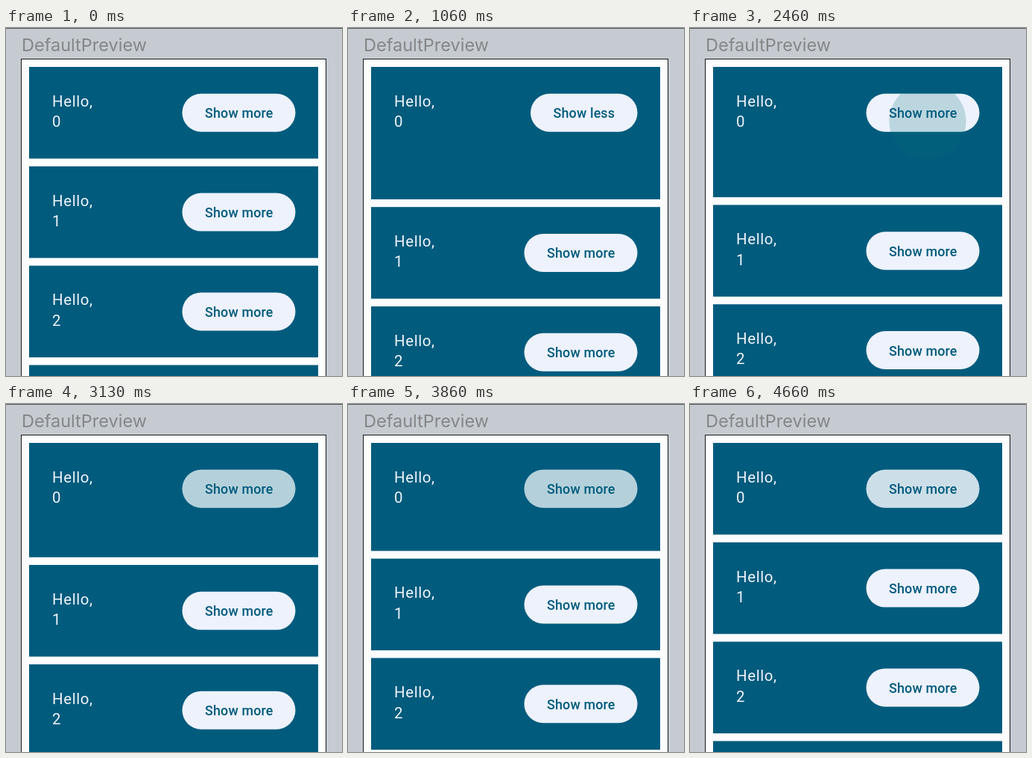
Recreate the animation shown at these times as an HTML page with a canvas. Size 451 by 465 pixels, loop 4730 ms.

```html
<!DOCTYPE html>
<html lang="en">
<head>
<meta charset="utf-8">
<title>Expandable list</title>
<style>
html, body { margin: 0; width: 100%; height: 100%; overflow: hidden; background: #c5cbd1; }
canvas { display: block; width: 451px; height: 465px; }
</style>
</head>
<body>
<canvas id="stage"></canvas>
<script>
const W = 451, H = 465, LOOP = 4730, STEP = LOOP / 71;
const OPEN = 54.3;            // extra height of the expanded card
const DECAY = 7.07, FREQ = 12.25; // spring: damping 0.5, stiffness 200
const CARD = { x: 31, y: 52, w: 388, h: 122.5, pitch: 132.8 };
const BLUE = '#005b7d';

// Each tap: press, release and, where the ripple lingers, start of its fade.
const taps = [
  [310, 365], [1215, 1275, 1640], [1902, 1985], [2400, 2448], [2685, 2740],
  [2975, 3043], [3335, 3390], [3700, 3763], [4045, 4100], [4375, 4430]
];

const canvas = document.getElementById('stage');
const ctx = canvas.getContext('2d');
const dpr = window.devicePixelRatio || 1;
canvas.width = W * dpr;
canvas.height = H * dpr;
ctx.scale(dpr, dpr);

const clamp = v => Math.max(0, Math.min(1, v));
const smooth = p => p * p * (3 - 2 * p);

function spring(pos, vel, target, ms) {
  const s = ms / 1000, a = pos - target, b = (vel + DECAY * a) / FREQ;
  const c = Math.cos(FREQ * s), n = Math.sin(FREQ * s), e = Math.exp(-DECAY * s);
  return [
    target + e * (a * c + b * n),
    e * ((FREQ * b - DECAY * a) * c - (DECAY * b + FREQ * a) * n)
  ];
}

function stateAt(t) {
  let pos = 0, vel = 0, open = false, last = 0;
  for (const [, click] of taps) {
    if (click > t) break;
    if (last) [pos, vel] = spring(pos, vel, open ? OPEN : 0, click - last);
    open = !open;
    last = click;
  }
  if (last) [pos] = spring(pos, vel, open ? OPEN : 0, t - last);
  return { open, extra: Math.max(0, pos) };
}

function text(str, x, y, font, color, spacing) {
  ctx.font = font;
  ctx.letterSpacing = spacing + 'px';
  ctx.fillStyle = color;
  ctx.fillText(str, x, y);
}

function pill(x, y, w, h) {
  ctx.beginPath();
  ctx.roundRect(x, y, w, h, h / 2);
}

function ripples(t, left, top, width) {
  for (const [press, , hold] of taps) {
    const age = t - press, fadeAt = hold ? hold - press : 225;
    if (age <= 0 || age >= fadeAt + 150) continue;
    const alpha = 0.25 * clamp(age / 75) * (1 - clamp((age - fadeAt) / 150));
    const r = 38 + 67 * smooth(clamp(age / 225));
    ctx.save();
    if (r > 60) {
      pill(left, top, width, 51);
      ctx.clip();
    }
    ctx.fillStyle = `rgba(10,110,117,${alpha})`;
    ctx.beginPath();
    ctx.arc(319, top + 37, r, 0, Math.PI * 2);
    // The small circle spills out below the button only.
    if (r <= 60) {
      ctx.save();
      ctx.beginPath();
      ctx.rect(CARD.x, top, CARD.w, 87);
      ctx.clip();
      ctx.beginPath();
      ctx.arc(319, top + 37, r, 0, Math.PI * 2);
      ctx.fill();
      ctx.restore();
    } else {
      ctx.fill();
    }
    ctx.restore();
  }
}

function card(i, y, h, open, t) {
  ctx.fillStyle = BLUE;
  ctx.fillRect(CARD.x, y, CARD.w, h);
  const font = '400 20.4px Roboto, sans-serif';
  text('Hello,', 62, y + 52.7, font, '#f1f5fb', 0.64);
  text(String(i), 62, y + 80.1, font, '#f1f5fb', 0.64);

  const width = open ? 143.5 : 152, left = 388.5 - width, top = y + 35.8;
  pill(left, top, width, 51);
  ctx.fillStyle = '#edf2fd';
  ctx.fill();
  if (i === 0) ripples(t, left, top, width);
  text(open ? 'Show less' : 'Show more', left + 30.6, y + 68.3,
    '500 17.9px Roboto, sans-serif', BLUE, 0.13);
}

function draw(t) {
  const { open, extra } = stateAt(t);
  ctx.fillStyle = '#c5cbd1';
  ctx.fillRect(0, 0, W, H);
  ctx.fillStyle = '#50555a';
  ctx.fillRect(0, 0, W, 1);
  text('DefaultPreview', 21, 30.6, '400 23.5px Inter, sans-serif', '#858687', 0);

  ctx.fillStyle = '#fdfdfe';
  ctx.fillRect(20.5, 41.5, 409, H);
  ctx.strokeStyle = '#16181a';
  ctx.lineWidth = 1;
  ctx.strokeRect(20.5, 41.5, 409, H);

  for (let i = 0; i < 4; i++) {
    const first = i === 0;
    card(i, CARD.y + i * CARD.pitch + (first ? 0 : extra),
      CARD.h + (first ? extra : 0), first && open, t);
  }
}

const start = performance.now();
function tick() {
  const t = (performance.now() - start) % LOOP;
  draw(Math.floor((t + 6) / STEP) % 71 * STEP);
  requestAnimationFrame(tick);
}
tick();
</script>
</body>
</html>
```
